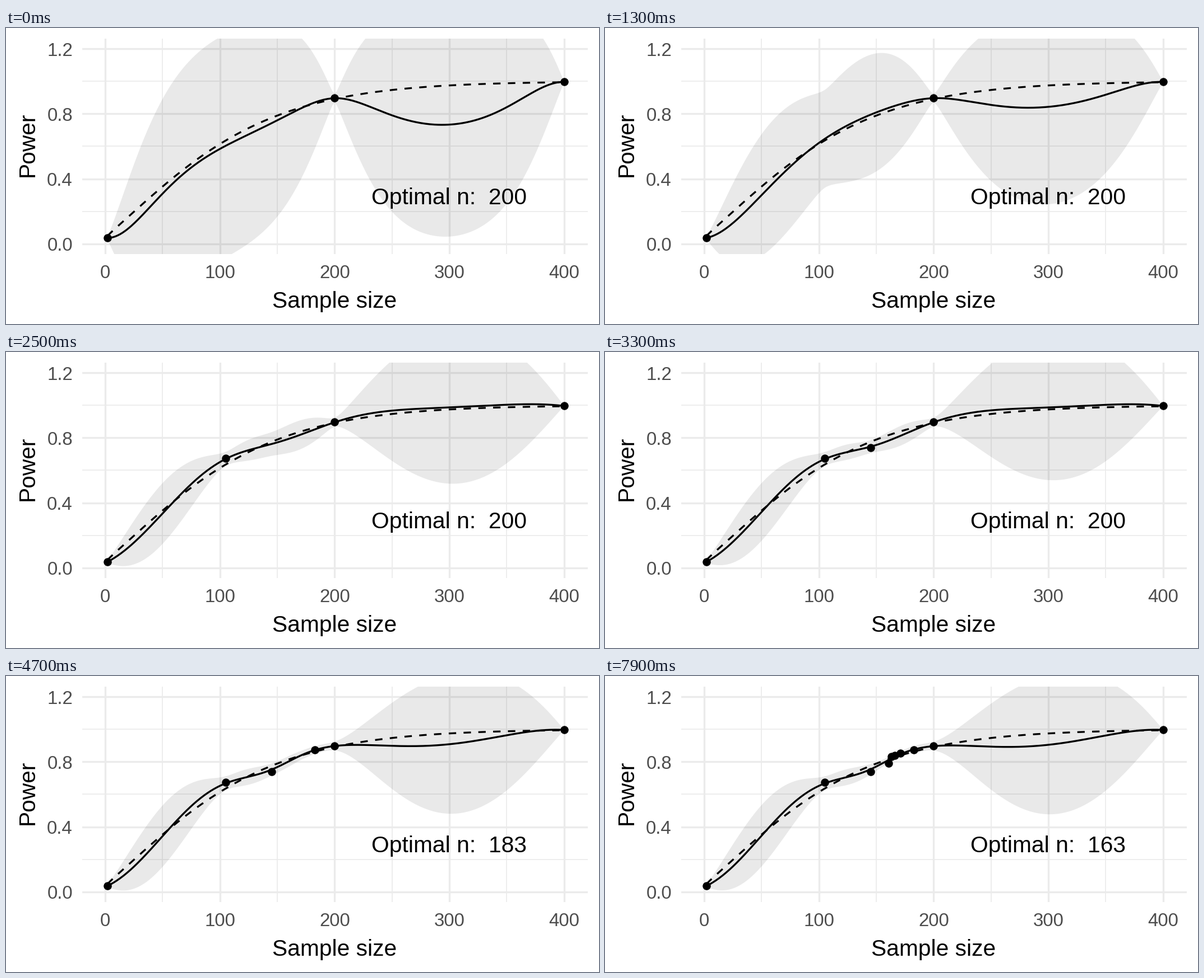
Animation, 1058 px wide and 529 px high, one loop 10000 ms. Source, as a matplotlib script:

```python
from math import erf, sqrt

import numpy as np
import matplotlib.pyplot as plt
from matplotlib.animation import FuncAnimation

W, H, DPI = 1058, 529, 100
PT = 72 / DPI                      # points per pixel
FRAMES, INTERVAL = 100, 100
STAGES, STEPS = 8, 5
NOISE, GOAL = 0.009, 0.8
X0, Y0, SX, SY = 176.8, 385.5, 2.0475, 290

plt.rcParams["font.family"] = "Liberation Sans"

# Evaluated designs in the order they are tried: sample size, power.
TRIALS = np.array([
    (2, .035), (200, .897), (400, .997), (105, .675), (145, .740),
    (183, .873), (171, .852), (166, .841), (161, .793), (163, .833),
])
# Kernel length and band scale; they settle after the first few stages.
KERNELS = ((51.4, .706), (103, .79), (115, .78), (98, .645))

grid = np.arange(2, 401.0)


def matern(a, b, length):
    d = sqrt(5) * np.abs(np.subtract.outer(a, b)) / length
    return (1 + d + d * d / 3) * np.exp(-d)


def fit(stage):
    """Mean and band of a constant-trend Gaussian process."""
    length, scale = KERNELS[min(stage, len(KERNELS) - 1)]
    x, y = TRIALS[:3 + stage].T
    noise = NOISE * y * (1 - y) / scale ** 2
    K = matern(x, x, length) + np.diag(noise)
    k = matern(grid, x, length)
    weights = np.linalg.solve(K, np.ones(len(x)))
    mu = weights @ y / weights.sum()
    mean = mu + k @ np.linalg.solve(K, y - mu)
    var = 1 - np.sum(k * np.linalg.solve(K, k.T).T, axis=1)
    half = scale * np.sqrt(np.clip(var, 0, None))
    return np.array([mean, mean - half, mean + half])


def true_power(n):
    return .5 * (1 + erf((.229 * sqrt(n) - 2) / sqrt(2)))


curves = [fit(i) for i in range(STAGES)]

fig = plt.figure(figsize=(W / 100, H / 100), dpi=DPI, facecolor="white")


def label(x, y, text, size, color="black", **kw):
    return fig.text(x / W, 1 - y / H, text, fontsize=size * PT, color=color,
                    va="baseline", **kw)


left, right, top, bottom = 136, 1037.5, 19.4, 403.6
ax = fig.add_axes([left / W, 1 - bottom / H,
                   (right - left) / W, (bottom - top) / H])
ax.set_xlim((left - X0) / SX, (right - X0) / SX)
ax.set_ylim((Y0 - bottom) / SY, (Y0 - top) / SY)
ax.axis("off")

x_major, y_major = np.arange(0, 401, 100), np.arange(0, 1.3, .4)
for xs, ys, width in ((x_major[:-1] + 50, y_major[:-1] + .2, 1.7),
                      (x_major, y_major, 3.4)):
    for v in xs:
        ax.axvline(v, color="#EBEBEB", lw=width * PT, zorder=0)
    for v in ys:
        ax.axhline(v, color="#EBEBEB", lw=width * PT, zorder=0)

for v in x_major:
    label(X0 + SX * v, 447, f"{v}", 33, "#4D4D4D", ha="center")
for v in y_major:
    label(119, Y0 - SY * v + 12.5, f"{v:.1f}", 33, "#4D4D4D", ha="right")
label(586.3, 500.5, "Sample size", 40.8, ha="center")
label(50, 208.5, "Power", 40.8, ha="center", rotation=90,
      rotation_mode="anchor")

band, = ax.fill([0, 1, 1], [0, 0, 1], color="black", alpha=.085, lw=0,
                zorder=1)
ax.plot(grid, [true_power(n) for n in grid], color="black", lw=3.3 * PT,
        ls=(0, (4, 4)), dash_capstyle="butt", zorder=2)
line, = ax.plot([], [], color="black", lw=3.3 * PT, zorder=3)
dots, = ax.plot([], [], "o", color="black", ms=14.5 * PT, mew=0, zorder=4)
best = label(652.3, 315, "", 40.8, ha="left")

band_x = np.concatenate([grid, grid[::-1]])


def progress(frame):
    """Stages passed so far, with a linear move between two of them."""
    starts = (min(11 * i, 10 * i + 5) for i in range(1, STAGES))
    return sum(min(max(frame - s + 1, 0), STEPS) for s in starts)


def draw(frame):
    stage, step = divmod(progress(frame), STEPS)
    mix = step / STEPS
    following = curves[min(stage + 1, STAGES - 1)]
    mean, low, high = (1 - mix) * curves[stage] + mix * following
    band.set_xy(np.column_stack([band_x, np.concatenate([low, high[::-1]])]))
    line.set_data(grid, mean)
    x, y = TRIALS[:3 + stage].T
    dots.set_data(x, y)
    best.set_text(f"Optimal n:  {x[y >= GOAL].min():.0f}")
    return band, line, dots, best


anim = FuncAnimation(fig, draw, frames=FRAMES, interval=INTERVAL,
                     repeat=True, repeat_delay=0)
plt.show()
```
